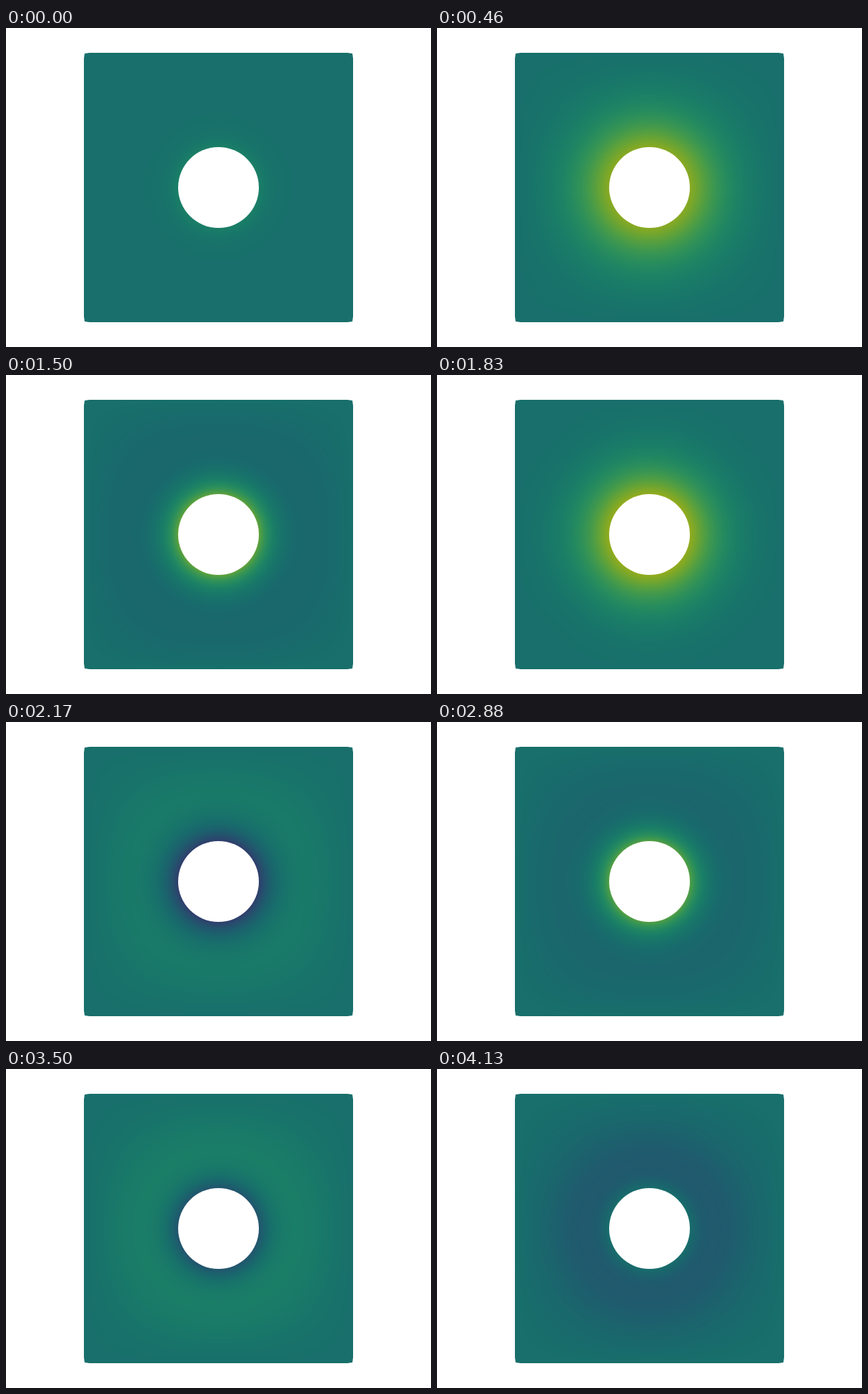
Recreate the animation shown at these times as an HTML page with a canvas. Size 600x450 px, loop 4170 ms.

```html
<!DOCTYPE html>
<html>
<head>
<meta charset="utf-8">
<style>
html, body { margin: 0; height: 100%; overflow: hidden; background: #fff; }
canvas { display: block; }
</style>
</head>
<body>
<canvas id="stage" width="600" height="450"></canvas>
<script>
// Heat flow in a square plate: the rim of a round hole oscillates, the outer edge stays at 0.
const LOOP = 4170, FRAMES = 100, CYCLES = 3;
const HALF = 190, HOLE = 57, STEP = 2, N = HALF / STEP, W = N + 1;
const FLOW = 290 / STEP ** 2, RELAX = 1.84, SWEEPS = 40;
const SHADE = 0.77;

function isHole(i, j) {
  return Math.hypot(i, j) * STEP <= HOLE;
}

// One quadrant is enough; the axes act as mirrors. Implicit time steps, solved by over-relaxation.
function simulate() {
  const free = [], rim = [], frames = [];
  for (let j = 0; j < N; j++)
    for (let i = 0; i < N; i++) (isHole(i, j) ? rim : free).push(j * W + i);
  const left = free.map(k => k % W ? k - 1 : k + 1);
  const up = free.map(k => k >= W ? k - W : k + W);
  let old = new Float32Array(W * W);
  for (let f = 1; f <= FRAMES; f++) {
    const u = old.slice();
    const heat = Math.sin(2 * Math.PI * CYCLES * f / FRAMES);
    for (const k of rim) u[k] = heat;
    for (let s = 0; s < SWEEPS; s++)
      for (let n = 0; n < free.length; n++) {
        const k = free[n];
        const sum = u[left[n]] + u[k + 1] + u[up[n]] + u[k + W];
        u[k] += RELAX * ((old[k] + FLOW * sum) / (1 + 4 * FLOW) - u[k]);
      }
    frames.push(u);
    old = u;
  }
  return frames;
}

// Polynomial fit of a purple-teal-yellow scale, one row per channel
const SCALE = [
  [0.2777, 0.1051, -0.3309, -4.6342, 6.2283, 4.7764, -5.4355],
  [0.0054, 1.4046, 0.2148, -5.7991, 14.1799, -13.7451, 4.6459],
  [0.3341, 1.3846, 0.0951, -19.3324, 56.6906, -65.3530, 26.3124]
];
const palette = Array.from({ length: 256 }, (_, n) =>
  SCALE.map(row => 255 * SHADE * row.reduceRight((sum, c) => sum * n / 255 + c, 0)));

const frames = simulate();
const ctx = document.getElementById("stage").getContext("2d");
const SIZE = 2 * N + 1;
const plate = document.createElement("canvas");
plate.width = plate.height = SIZE;
const plateCtx = plate.getContext("2d");
const pixels = plateCtx.createImageData(SIZE, SIZE);

function paintPlate(u) {
  let p = 0;
  for (let y = -N; y <= N; y++)
    for (let x = -N; x <= N; x++) {
      const v = u[Math.abs(y) * W + Math.abs(x)];
      const color = palette[Math.max(0, Math.min(255, Math.round(127.5 * (v + 1))))];
      for (let c = 0; c < 3; c++) pixels.data[p++] = color[c];
      pixels.data[p++] = 255;
    }
  plateCtx.putImageData(pixels, 0, 0);
}

// Square with slightly worn corners
const outline = new Path2D();
for (const [sx, sy] of [[1, 1], [-1, 1], [-1, -1], [1, -1]]) {
  const corner = [[190, 182], [189, 189], [182, 190]];
  if (sx !== sy) corner.reverse();
  for (const [x, y] of corner) outline.lineTo(sx * x, sy * y);
}
outline.closePath();

let shown = -1;
function draw() {
  const time = performance.now() % LOOP;
  const f = Math.min(FRAMES - 1, Math.floor(time * 0.024 + 0.1));
  if (f !== shown) {
    shown = f;
    paintPlate(frames[f]);
    ctx.fillStyle = "#fff";
    ctx.fillRect(0, 0, 600, 450);
    ctx.save();
    ctx.translate(300, 225);
    ctx.clip(outline);
    ctx.drawImage(plate, -SIZE, -SIZE, 2 * SIZE, 2 * SIZE);
    ctx.beginPath();
    ctx.arc(0, 0, HOLE, 0, 2 * Math.PI);
    ctx.fill();
    ctx.restore();
  }
  requestAnimationFrame(draw);
}
draw();
</script>
</body>
</html>
```
